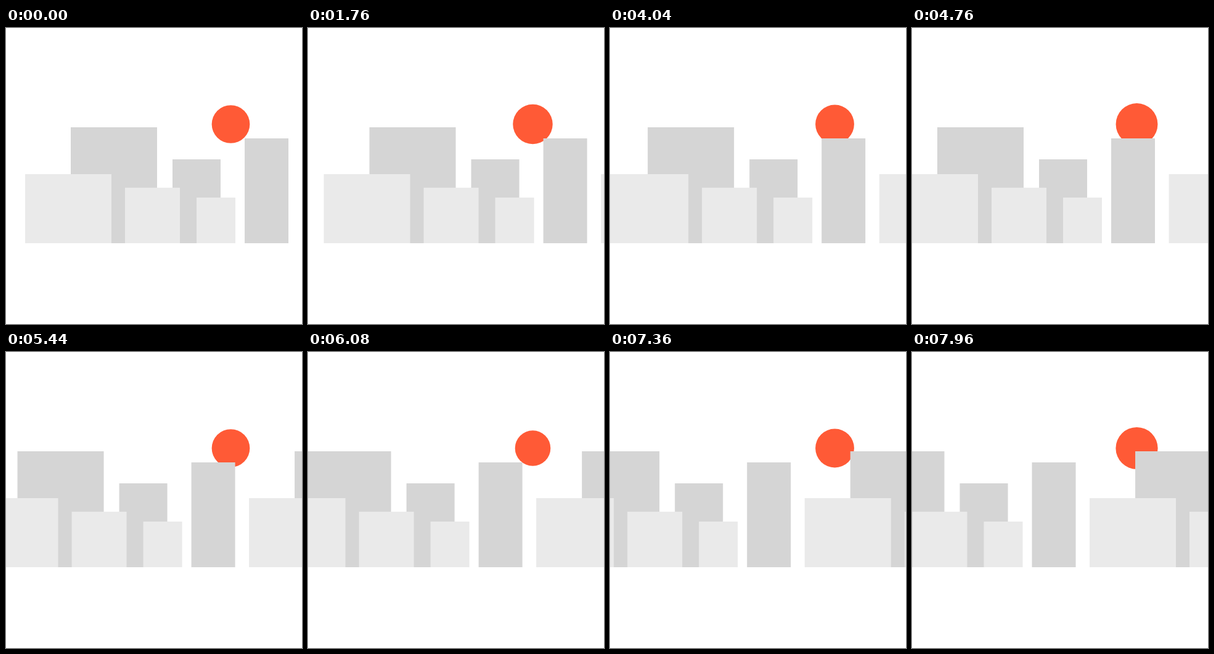
Animation of 480x480 px, one loop 8000 ms. Source, as an HTML page with a canvas:

```html
<!DOCTYPE html>
<html lang="en">
<head>
<meta charset="utf-8">
<title>Skyline</title>
<style>
  html, body { margin: 0; width: 100%; height: 100%; overflow: hidden; background: #fff; }
  canvas { display: block; width: 100%; height: 100%; }
</style>
</head>
<body>
<canvas id="stage" width="480" height="480"></canvas>
<script>
const ctx = document.getElementById('stage').getContext('2d');

const LOOP = 8000, STEP = 40, START = 480;
const SCROLL = { distance: 449.5, duration: 16325 };
const PULSE = { period: 3320, radii: [30.85, 34.1, 30.85, 28.5] };
const GROUND = 349;

// Each building: left, top, width
const LAYERS = [
  { color: '#d5d5d5', buildings: [[105, 161, 140], [270, 213, 78], [387, 179, 71]] },
  { color: '#eaeaea', buildings: [[31, 237, 140], [193, 259, 89], [309, 275, 63]] }
];

// cubic-bezier(.42, 0, .58, 1), solved for x by bisection
function easeInOut(x) {
  let low = 0, high = 1;
  for (let i = 0; i < 24; i++) {
    const u = (low + high) / 2;
    if (1.26 * u - 0.78 * u * u + 0.52 * u ** 3 < x) low = u;
    else high = u;
  }
  return low * low * (3 - 2 * low);
}

function sunRadius(time) {
  const { period, radii } = PULSE;
  const phase = (time / period) % 1 * radii.length;
  const i = Math.floor(phase);
  const from = radii[i], to = radii[(i + 1) % radii.length];
  return from + (to - from) * easeInOut(phase - i);
}

function draw(time) {
  ctx.fillStyle = '#fff';
  ctx.fillRect(0, 0, 480, 480);

  ctx.fillStyle = '#ff5a36';
  ctx.beginPath();
  ctx.arc(364.5, 156, sunRadius(time), 0, 2 * Math.PI);
  ctx.fill();

  const shift = SCROLL.distance * easeInOut(time / SCROLL.duration);
  for (const { color, buildings } of LAYERS) {
    ctx.fillStyle = color;
    for (const [left, top, width] of buildings) {
      for (const tile of [0, SCROLL.distance]) {
        ctx.fillRect(left + tile - shift, top, width, GROUND - top);
      }
    }
  }
}

function frame() {
  const time = Math.floor(performance.now() % LOOP / STEP) * STEP;
  draw(Math.max(0, time - START));
  requestAnimationFrame(frame);
}
frame();
</script>
</body>
</html>
```
